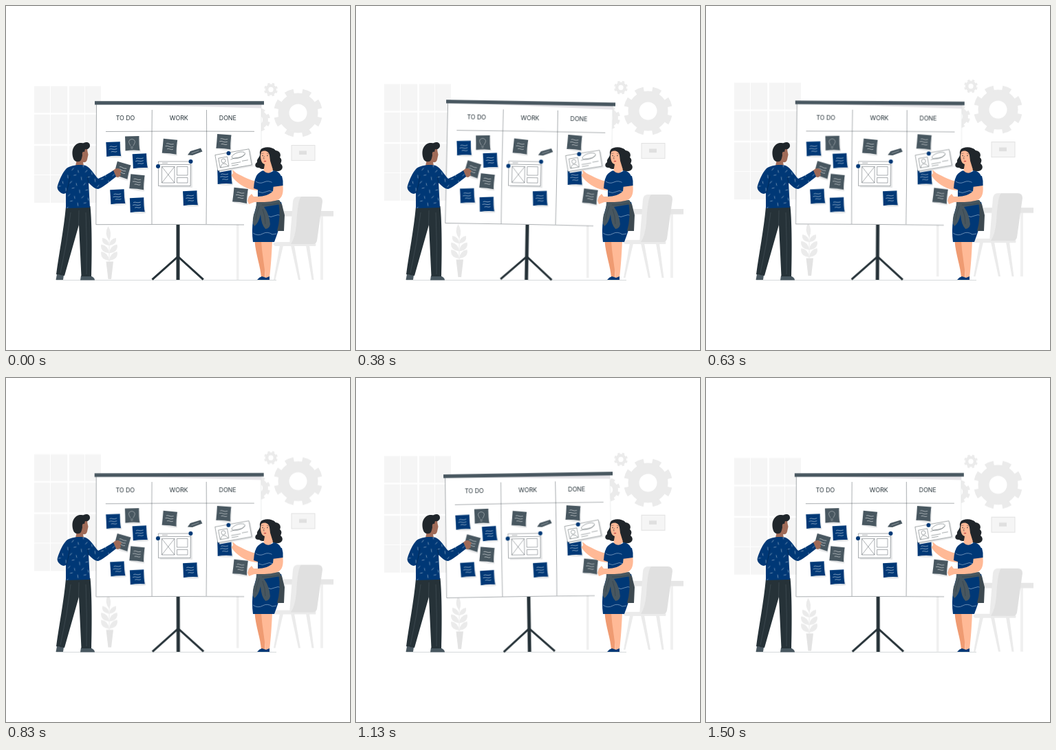
An HTML page without scripts for the animation above (1540 ms loop, 500 by 500 pixels).

```html
<!DOCTYPE html>
<html lang="en">
<head>
<meta charset="utf-8">
<title>Task board</title>
<style>
html, body { margin: 0; width: 100%; height: 100%; overflow: hidden; background: #fff; }
svg { display: block; width: 100vw; height: 100vh; }
.float { animation: float 1540ms linear infinite; }
.board { transform-origin: 250px 260px; animation: sway 1540ms linear infinite; }
@keyframes float { 50% { transform: translateY(-6px); } }
@keyframes sway {
  25% { transform: rotate(1deg); }
  75% { transform: rotate(-1deg); }
}
.blue { color: #003876; fill: #003876; }
.gray { color: #485760; fill: #485760; }
.dark { fill: #263238; }
.tan { fill: #a06b58; }
.skin { fill: #ffb996; }
.pale { fill: #ebebeb; }
.faint { fill: #f5f5f5; }
.ink { fill: none; stroke: #263238; stroke-width: .4; }
.chalk { fill: none; stroke: #fff; stroke-width: .5; stroke-linecap: round; }
text { font: 400 8.8px Inter, Lato, sans-serif; fill: #263238; text-anchor: middle; }
</style>
</head>
<body>
<svg viewBox="0 0 500 500">
  <defs>
    <g id="paper">
      <path d="M-8 9 L11 -7 L12.300 12.500 Q2 13.500 -8 12Z" fill="#e8e9ea"/>
      <path d="M-10.500 -10 L10 -10.500 Q9.500 2 11 10.500 Q0 9.500 -10 11 Q-10 0 -10.500 -10Z" fill="currentColor"/>
    </g>
    <g id="note">
      <use href="#paper"/>
      <path class="chalk" d="M-5 -3.500 q2 -1 4 0 t6 -.3 M-6 .3 q3 -1 5 0 t6 -.3 M-3 4 q2 -.8 4 0 t4 -.2"/>
    </g>
    <!-- Gear of radius 35: a ring with eight thick dashes as teeth -->
    <g id="gear" fill="none" stroke="#ebebeb">
      <circle r="21" stroke-width="16"/>
      <circle r="31.500" stroke-width="8" pathLength="80" stroke-dasharray="5 5" transform="rotate(11.250)"/>
    </g>
    <pattern id="flecks" width="20" height="19" patternUnits="userSpaceOnUse" patternTransform="rotate(8)">
      <path d="M3 3 l1 4 M12 2 l3 -1 M10 11 l-2 3 M17 13 l1 3" stroke="#b5c6d6" stroke-width=".6" stroke-linecap="round"/>
    </pattern>
    <path id="sweater" d="M88 236 C95 231 108 230 116 232 C124 236 128 245 134 251 C141 248 150 243 156 239 L160 248 C151 255 142 263 134 266 C129 266 124 261 120 257 L122 293 L87 294 L87 272 L84 273 C78 272 73 266 75 261 C78 252 82 242 88 236Z"/>
    <path id="leaf" d="M0 0 Q-14 -2 -11.500 -13 Q-1 -11 0 0Z"/>
    <g id="leaves"><use href="#leaf"/><use href="#leaf" transform="scale(-1 1)"/></g>
  </defs>

  <g class="float">
    <rect class="faint" x="41" y="116.500" width="97" height="169.500"/>
    <path d="M64.500 116 V286 M114.500 116 V286 M41 245.500 H138" stroke="#fff"/>
    <path d="M90.500 116 V286 M41 156.500 H138 M41 202 H138" stroke="#fff" stroke-width="2.600"/>

    <use href="#gear" transform="translate(424.500 155.500)"/>
    <use href="#gear" transform="translate(385 121.500) scale(.28)"/>
    <use href="#gear" transform="translate(367 165.500) scale(.48)"/>

    <rect class="faint" x="415" y="202.500" width="34" height="22" stroke="#e3e3e3"/>
    <rect x="426" y="210.500" width="11" height="5.500" fill="#e0e0e0"/>

    <g class="pale">
      <path d="M330 298 H476 V305.500 H461 V398 H457 V305.500 H338.500 V398 H335 V305.500 H330Z" fill="#f0f0f0"/>
      <path d="M404 298 H476 V305.500 H404Z" fill="#e6e6e6"/>
      <path d="M398 348 L389 398 H391.500 L403 348Z M414 348 L425 398 H428 L419 348Z M436 348 L444.500 398 H447.500 L441 348Z"/>
      <path d="M388 346 Q390 343 395 343 H446 Q452 344 450 349 H391Z"/>
      <path d="M424 277 H452 L444 347 H412 Q415 310 417 284 Q418 277 424 277Z"/>
      <path d="M429 277 H453 Q460 277 460 284 L452 341 Q451 346 446 346 H414 Q420 338 422 318 Q424 281 429 277Z" fill="#e0e0e0"/>
    </g>

    <g class="pale">
      <path d="M145.500 371.500 H156 L153 397 H148.500Z" fill="#e3e3e3"/>
      <path d="M148.500 320 Q155 330 150 341 Q142 331 148.500 320Z"/>
      <use href="#leaves" transform="translate(150 348) scale(.85)"/>
      <use href="#leaves" transform="translate(150 359.500)"/>
      <use href="#leaves" transform="translate(150 370)"/>
      <path d="M150 337 V372" stroke="#ebebeb"/>
    </g>
  </g>

  <path d="M73 398.300 H393" stroke="#7d888e" stroke-width=".4"/>

  <g class="board">
    <path class="dark" d="M247.500 316 H252.500 V398 H247.500Z"/>
    <path d="M212.500 397.700 L250 364.200 L286.800 397.700" fill="none" stroke="#263238" stroke-width="3"/>
    <path d="M131.500 142 H371 V318 H131Z" fill="#fff"/>
    <path d="M160 143 H371 V148.500Z" fill="#e6e4e8"/>
    <path class="ink" d="M131.500 143 L130.800 317.700 Q240 317 346 318"/>
    <path d="M371 143 V318" stroke="#d5d8da" stroke-width=".5"/>
    <path class="gray" d="M129 138.300 H375 V143.600 H129Z"/>
    <path class="ink" d="M145 182.500 Q250 181.500 361 182.300 M212.300 151 Q211.500 230 212 317 M291.500 151 Q292 230 291 317"/>

    <text x="173.500" y="166.400">TO DO</text>
    <text x="251.300" y="166.400">WORK</text>
    <text x="322.300" y="166.400">DONE</text>

    <g class="blue">
      <use href="#note" transform="translate(156 207.800) rotate(-1)"/>
      <use href="#note" transform="translate(194.500 225) rotate(-2)"/>
      <use href="#note" transform="translate(162 277) rotate(-2)"/>
      <use href="#note" transform="translate(190.500 289) rotate(-1)"/>
      <use href="#note" transform="translate(267.700 279) rotate(-1)"/>
      <use href="#note" transform="translate(317.700 248)"/>
    </g>
    <g class="gray">
      <use href="#paper" transform="translate(183.500 199.500)"/>
      <use href="#note" transform="translate(169 238.500) rotate(17)"/>
      <use href="#note" transform="translate(190.500 255.500) rotate(7)"/>
      <use href="#note" transform="translate(238 204) rotate(7)"/>
      <use href="#note" transform="translate(316.500 197) rotate(6)"/>
      <use href="#note" transform="translate(340.500 275) rotate(8)"/>
      <path d="M264 216.500 L268 211 L283 206.500 L285.500 211.500 L271 217Z"/>
    </g>
    <path class="chalk" d="M181 203 q-5 -7 0 -9 q2 -1 4 0 q5 2 0 9 M181.500 205 h3 M182 207 h2 M270 214 l10 -3.500" opacity=".75"/>

    <path d="M224 229 H271 V264 H224Z" fill="#e8e9ea"/>
    <path class="ink" d="M221.500 226 H268.500 L268 261.500 H221.500Z" style="fill:#fff"/>
    <path class="ink" d="M222 230.500 H268 M226.500 233.500 H245 V257 H226.500Z L245 257 M245 233.500 L226.500 257 M248.500 233.500 H264 V246 H248.500Z M248.500 249.500 H264 V257 H248.500Z M227 228.300 h8"/>
    <g class="blue"><circle cx="221" cy="233" r="3"/><circle cx="268.500" cy="226" r="3"/></g>

    <g transform="translate(330.500 223.500) rotate(-10)">
      <path d="M-23 -9 H27 V14.500 H-23Z" fill="#e8e9ea"/>
      <path class="ink" d="M-25 -11.500 H25 V12 H-25Z" style="fill:#fff"/>
      <path class="ink" d="M-21 -6 H-8 V8 H-21Z M-20 8 q1 -5 5 -5 t6 5 M-4 5 H10 M-4 8 H6 M12 4 h9 M-4 -1 q7 -2 12 -1 t10 -3"/>
      <circle class="ink" cx="-14.500" cy="-1" r="3"/>
      <ellipse class="ink" cx="9" cy="-4" rx="10" ry="4" transform="rotate(-8)"/>
    </g>
    <circle class="blue" cx="323.500" cy="214" r="3"/>
  </g>

  <g id="man">
    <path class="gray" d="M74 390 L84 391 L83 398 H72.500Z M109 392 H122 Q129 394 129 398.500 H108Z"/>
    <path class="dark" d="M87 292 L122.500 291 C125 315 125 360 124 393 L109.500 393 L106 318 L85 392 L73 390 C77 360 84 325 87 292Z"/>
    <path d="M106 297 L105.500 319 M116 300 Q118 345 117 390 M94 300 Q89 345 79 388" fill="none" stroke="#59666c" stroke-width=".4"/>
    <path class="tan" d="M103 222 L108 206 L118 206 Q118 211 119.500 216 L118 223 Q117 228 112 227 L113 233 Q107 236 101 233Z"/>
    <path d="M98 222 C95 214 96 204 104 200 C108 198 111 200 113 199 C117 197 122 198 122 203 C122 207 118 209 115 208 L114 212 Q110 211 111 217 C110 222 109 226 106 226 C102 227 99 225 98 222Z" fill="#20262b"/>
    <path class="tan" d="M154 241 C158 236 162 235 165 237 L168 240 L166 243 L167 246 L163 249 L158 248Z"/>
    <use href="#sweater" class="blue"/>
    <use href="#sweater" fill="url(#flecks)"/>
    <path d="M93 247 Q91 260 88 271 M120 257 L118 247" fill="none" stroke="#00284f" stroke-width=".7"/>
  </g>

  <g id="woman">
    <path d="M361.500 342 H376 L376.500 395 H371 C370 378 363 362 361.500 342Z" fill="#ef9b72"/>
    <path class="skin" d="M371 342 H387 C386 362 385 378 383 395 H377 C376 378 372 360 371 342Z"/>
    <path class="blue" d="M365 398 Q368 394 372 393 L378 395 L383 393 V398Z"/>
    <path d="M370 209 C374 204 387 204 392 210 C399 211 400 217 398 220 C402 223 400 227 399 229 C404 233 402 239 396 240 C388 241 384 237 377 235 C374 239 369 236 368 235 C361 236 361 229 365 227 C364 222 369 220 369 216 Q368 212 370 209Z" fill="#20262b"/>
    <path class="skin" d="M371 212 C376 209 382 211 383 217 L384 225 L388 238 L381 246 L374 242 L376 230 C371 229 370 222 370 217Z"/>
    <path d="M371.500 214.500 l3 -.5 M379 214.500 l3 .5 M375.500 218 l-1.500 4 h2" class="ink"/>
    <circle class="dark" cx="373" cy="217.500" r=".7"/><circle class="dark" cx="380" cy="217.500" r=".7"/>
    <path d="M374.500 225.500 q2 -1.500 4 0 q-2 2 -4 0Z" fill="#c94a45"/>
    <path class="skin" d="M366 255 C355 254 345 248 335 243 L329 238 L330 243 L327.500 246 L331 251 C338 259 352 268 366 268Z"/>
    <path class="blue" d="M366 244 C371 240 374 238 375 240 Q381 246 389 239 C398 240 403 248 402 262 L391 263 L391 284 L400 285 C405 300 397 325 390 343 L359 343 C356 320 360 300 366 285 L366 267 L360 265 Q361 249 366 244Z"/>
    <path d="M363 255 q6 4 12 1 t13 1 t12 -1 M367 270 q6 3 11 0 t10 0 M380 305 q5 3 10 0 t11 0 M359 330 q7 5 14 1 t14 1 l6 -1" fill="none" stroke="#a9c0d8" stroke-width=".6"/>
    <path d="M396 285 L401 288 L405 304 L404 327 H394 Q400 306 396 285Z" fill="#3d4950"/>
    <path class="gray" d="M364 284 L397 282 Q400 285 399 288 L375 292 Q383 303 384 317 Q383 324 377 324 Q371 318 370 303 Q367 316 361 320 Q357 316 360 303 Q364 295 364 284Z"/>
    <path d="M372 289 q10 1 27 -3 M368 291 q-4 11 -5 20 M373 295 q4 11 4 22" fill="none" stroke="#2f3b42" stroke-width=".5"/>
    <path class="skin" d="M389 259 L402 258 C404 270 402 280 394 282 C383 286 367 285 361 285 L353 288 L351 283 L353 277 L357 273 L360 277 L366 277 C374 277 384 274 388 269Z"/>
    <path class="blue" d="M386 250 L401 247 Q403 253 402.500 261 L387 263Z"/>
  </g>
</svg>
</body>
</html>
```
